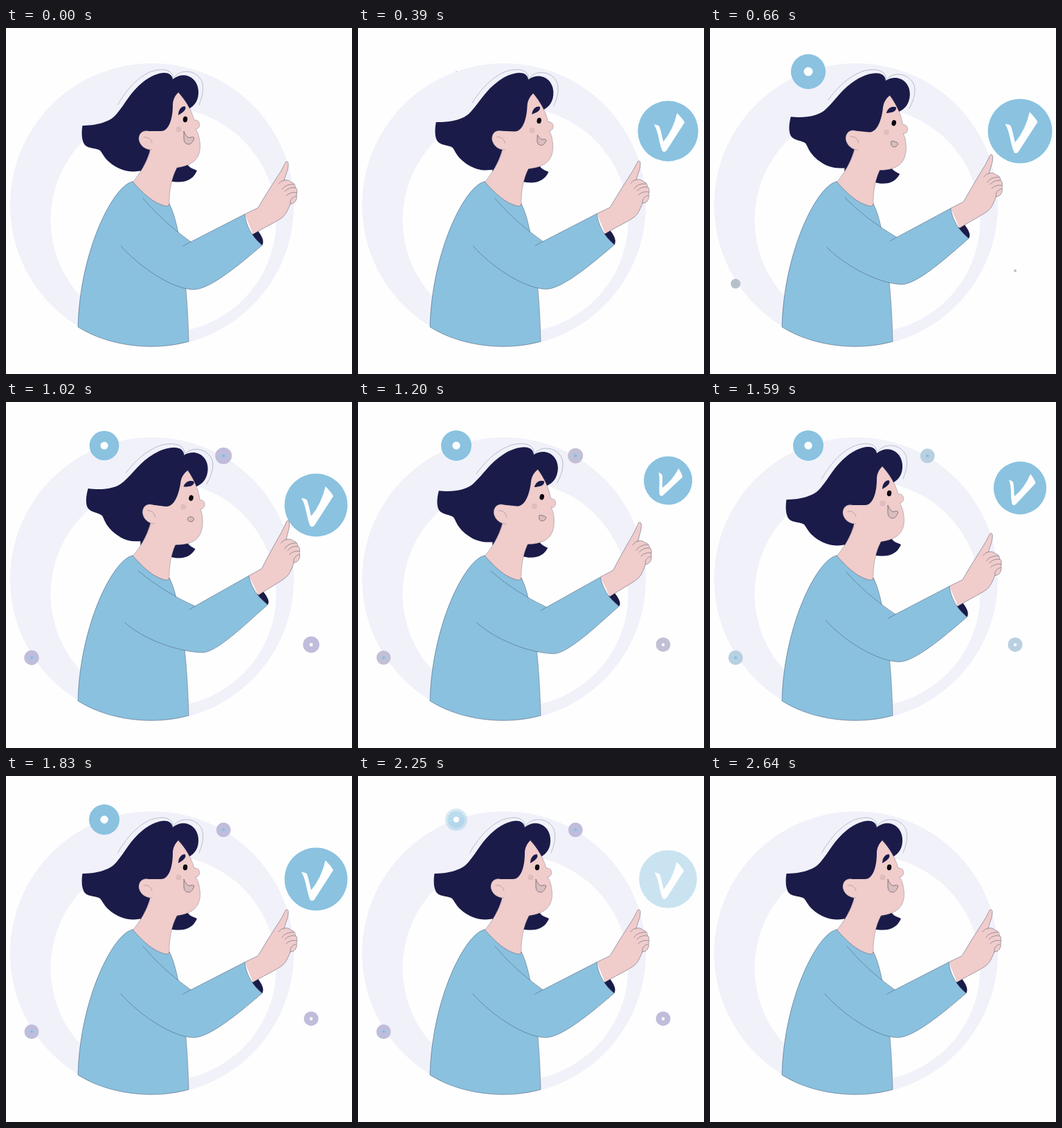
An HTML page for the animation above (2.91 s loop, 500 by 500 pixels).

```html
<!DOCTYPE html>
<html lang="en">
<head>
<meta charset="utf-8">
<title>Approve</title>
<style>
html, body { margin: 0; width: 100%; height: 100%; overflow: hidden; background: #fefefe; }
svg { display: block; width: 100%; height: 100%; }
.skin { fill: #f0cccb; }
.navy { fill: #1a1b49; }
.shirt { fill: #8ac1df; }
.blue { fill: #8ac2e0; }
.line { fill: none; stroke: #43526b; stroke-opacity: .55; stroke-width: .9; stroke-linecap: round; stroke-linejoin: round; }
.thin { stroke-opacity: .4; stroke-width: .8; }
</style>
</head>
<body>
<svg viewBox="0 0 500 500">
  <circle cx="211" cy="256" r="205" fill="#f1f1fa"/>
  <circle cx="227.5" cy="277.5" r="163" fill="#fefefe"/>

  <g id="bubble">
    <circle class="blue" r="45.5"/>
    <path fill="#fefefe" d="M-21,-10 C-18,-10 -14,-9 -13,-7 C-10,1 -9,9 -7,16 Q8,-2 13.500,-27 C18,-23 23,-17 25,-13 L-2,29 C-4,32 -8,32 -9,29 C-14,16 -14,2 -21,-10Z"/>
  </g>
  <g id="ring">
    <circle class="blue fade" r="22"/>
    <circle class="blue fade" r="17"/>
    <circle r="5.7" fill="#fefefe"/>
  </g>
  <g id="dots"></g>

  <g id="hair">
    <path class="navy" d="M236,221 L242,200 C252,200 257,198 262,197 C266,203 272,204 276,206 C271,219 258,226 236,221Z"/>
    <path class="navy" d="M110.500,141 C128,141 150,137 160,124 C172,110 180,92 198,78 C214,65 238,58 241,74 C256,62 276,70 278,90 C279,104 273,112 264,117 L250,150 L214,168 L200,205 C188,208 175,210 158,200 C142,190 141,183 136,177 C130,173 120,175 114,169 C109,163 109,150 110.500,141Z"/>
    <path class="line thin" d="M161.500,111 C171,94 186,74 207,64 C225,57 243,59 241,75 M243,71 C253,58 276,61 283,77 C287,89 283,101 279,111"/>
  </g>
  <path class="navy" d="M194,190 L212,172 L200,206 L194.500,210Z"/>

  <path class="skin" d="M183,223 C195,208 203,195 209,174 L250,180 L247,202 C240,215 235,235 236,260 L220,262Z"/>
  <path class="line thin" d="M183,223 C195,208 203,195 209,177 M247,203 C240,215 235,235 236,256"/>
  <path class="shirt" d="M183,222 C199,240 212,252 229,257 C233,258 236,257 236,254 C250,280 262,360 264,453 C215,467 150,461 104,432 C107,320 156,226 183,222Z"/>
  <path class="line" d="M183,222 C199,240 212,252 229,257 C233,258 236,257 236,254 C250,280 262,360 264,453 C215,467 150,461 104,432 C107,320 156,226 183,222Z"/>

  <g id="face">
    <path class="skin" d="M249,93 C244,98 241,104 241,112 C241,130 236,149 224,149 L204,149 L208,178 C215,196 235,203 247,202 C268,199 286,190 279,158 C278,153 276,149 274,146 C282,146 282,132 272,133 C268,118 259,104 249,93Z"/>
    <path class="line thin" d="M249,93 C259,104 268,118 272,133 C282,132 282,146 274,146 C276,149 278,153 279,158 C286,190 268,199 247,202"/>
    <path class="skin" d="M206,149 C197,147 191,153 192,162 C194,171 203,177 211,176 L216,150Z"/>
    <path class="line thin" d="M206,149 C197,147 191,153 192,162 C194,171 203,177 211,176 M199,158 C206,157 210,161 211,166"/>
    <circle cx="249.500" cy="146.500" r="4" fill="#dfbcbd"/>
    <ellipse cx="259" cy="132" rx="3.200" ry="4.200" fill="#060611" transform="rotate(8 259 132)"/>
    <path id="brow" class="navy"/>
    <path id="mouth" fill="#dabdbd" stroke="#6e6570" stroke-width=".8"/>
  </g>

  <path id="inside" class="navy"/>
  <g id="hand">
    <path class="skin" d="M345,269 L364,260 C374,243 388,221 394,212 C398,206 402,198 404,194 C406,192 408,193 408,197 C408,205 404,212 402,220 C407,219 411,221 412,223 C416,223 418,227 418,230 C421,232 421,237 420,240 C421,246 419,254 411,254 C407,264 404,270 399,274 C388,282 375,287 357,298Z"/>
    <path class="line" d="M345,269 L364,260 C374,243 388,221 394,212 C398,206 402,198 404,194 C406,192 408,193 408,197 C408,205 404,212 402,220 C407,219 411,221 412,223 C416,223 418,227 418,230 C421,232 421,237 420,240 C421,246 419,254 411,254 C407,264 404,270 399,274 C388,282 375,287 357,298 M394,225 Q398,220 402,220 M399,233 Q404,225 416,226 M403,236 Q410,229 418,231 M405,242 Q412,236 420,238 M411,254 C410,247 415,244 419,243"/>
  </g>
  <path id="sleeve" class="shirt"/>
  <path id="seams" class="line"/>
</svg>
<script>
const LOOP = 2910, STEP = 30;
const $ = id => document.getElementById(id);
const clamp = x => Math.max(0, Math.min(1, x));
const span = (t, a, b) => clamp((t - a) / (b - a));
const ease = (t, a, b) => { const u = span(t, a, b); return u * u * (3 - 2 * u); };

// Blend two path strings that share the same commands.
function mix(a, b, p) {
  const nums = b.match(/-?[\d.]+/g);
  let i = 0;
  return a.replace(/-?[\d.]+/g, n => (+n + (nums[i++] - n) * p).toFixed(2));
}

// Piecewise linear value through [time, value...] rows.
function track(rows, t) {
  let i = 0;
  while (i < rows.length - 2 && t > rows[i + 1][0]) i++;
  const [a, ...from] = rows[i], [b, ...to] = rows[i + 1];
  const u = span(t, a, b);
  return from.map((v, k) => v + (to[k] - v) * u);
}

const POP = [[0, 0], [60, .37], [120, .67], [210, .96], [270, 1.14], [330, 1.17],
  [390, 1.13], [480, 1.02], [630, .97], [750, 1]];
const pop = (t, start) => track(POP, t - start)[0];

const TINT = [[540, 180, 190, 196], [700, 182, 192, 201], [1020, 191, 189, 219],
  [1350, 195, 194, 210], [1590, 184, 208, 224], [1830, 191, 189, 219]];

const SHAPES = {
  brow: ['M249,126 C249,118 254,112 259,113.5 C261,119 255,122 249,126Z',
         'M246,117 C247.5,109 255,106 260,108 C262,114 254,117 246,117Z'],
  mouth: ['M257,149 C258,153 261,157 264,158.5 C266,159 270,156 272,159 C270,165 267,168 264,168 C259,168 257,164 257,159Z',
          'M258.5,161 C260,159 262,159 263,159 C266,159 267,161 267,162.5 C266,165.5 264,166 262.5,166 C260,166 258,164.5 258,162.5Z']
};
const ARM = {
  inside: ['M354,299 L364,293 Q371,302 371.5,308 Q371.5,313 370,314 L358,303Z',
           'M361,279 L371,273 Q378.5,282 379.5,288 Q379.5,292 378,293 L366,282Z'],
  sleeve: ['M198,246 Q225,279 267,309 L345,269 C347,285 354,300 370,314 C335,344 294,378 271,378 C240,377 195,347 166,315Z',
           'M191,244 Q225,273 273,295 L351,251 C354,266 362,280 378,293 C343,324 304,362 284,362 C250,361 200,344 172,319Z'],
  seams: ['M198,246 Q225,279 267,309 M256,315 L267,309 L345,269 C347,285 354,300 370,314 C335,344 294,378 271,378 C240,377 195,347 166,315',
          'M191,244 Q225,273 273,295 M265,300 L273,295 L351,251 C354,266 362,280 378,293 C343,324 304,362 284,362 C250,361 200,344 172,319']
};

const DOTS = [
  { x: 37, y: 369.5, start: 540, end: 2310, hole: '#7fc0e3', size: 2.1 },
  { x: 441, y: 350.7, start: 630, end: 2340, hole: '#fefefe', size: 2.2 },
  { x: 314.3, y: 77.8, start: 740, end: 2370, hole: '#7fc0e3', size: 2.1 }
];
const NS = 'http://www.w3.org/2000/svg';
function circle(parent, r, fill) {
  const c = document.createElementNS(NS, 'circle');
  c.setAttribute('r', r);
  c.setAttribute('fill', fill);
  return parent.appendChild(c);
}
for (const d of DOTS) {
  d.g = $('dots').appendChild(document.createElementNS(NS, 'g'));
  d.disc = circle(d.g, 10.5, '#bfbddb');
  d.eye = circle(d.g, d.size, d.hole);
}

const fades = document.querySelectorAll('.fade');

function place(el, x, y, scale, turn = 0) {
  el.setAttribute('transform', `translate(${x} ${y}) rotate(${turn}) scale(${scale})`);
  el.style.display = scale > .001 ? '' : 'none';
}

function draw(t) {
  const nod = ease(t, 90, 900) - ease(t, 1050, 1560);
  const lift = ease(t, 300, 1050) - ease(t, 1050, 1770);
  const toss = ease(t, 1050, 1320) - ease(t, 1320, 1800);
  const out = span(t, 2100, 2370);

  $('face').setAttribute('transform', `rotate(${7.5 * nod} 212 200)`);
  $('hair').setAttribute('transform',
    `translate(${-nod} ${-2.5 * nod}) rotate(${8 * nod} 212 200)`);
  for (const id in SHAPES) $(id).setAttribute('d', mix(...SHAPES[id], nod));
  for (const id in ARM) $(id).setAttribute('d', mix(...ARM[id], lift));
  $('hand').setAttribute('transform',
    `translate(${6 * lift} ${-18 * lift}) rotate(${-3.5 * lift} 345 269)`);

  const size = pop(t, 180) * (1 - .395 * toss) * (1 - .26 * out * out);
  place($('bubble'), 448, 149 - 61 * toss, out < 1 ? size : 0, 25 * toss);
  $('bubble').setAttribute('opacity', 1 - out);

  place($('ring'), 142, 63, out < 1 ? pop(t, 385) * (1 - .87 * out * out) : 0);
  fades.forEach(c => c.setAttribute('opacity', Math.pow(1 - out, 1.3)));

  const tint = `rgb(${track(TINT, t).map(Math.round)})`;
  for (const d of DOTS) {
    place(d.g, d.x, d.y, pop(t, d.start) * (1 - ease(t, d.end, d.end + 240)));
    d.disc.setAttribute('fill', tint);
    d.eye.setAttribute('r', d.size * span(t, d.start + 150, d.start + 270));
  }
}

const begin = performance.now();
function tick() {
  const t = (performance.now() - begin) % LOOP;
  draw(Math.floor(t / STEP) * STEP);
  requestAnimationFrame(tick);
}
draw(0);
requestAnimationFrame(tick);
</script>
</body>
</html>
```
